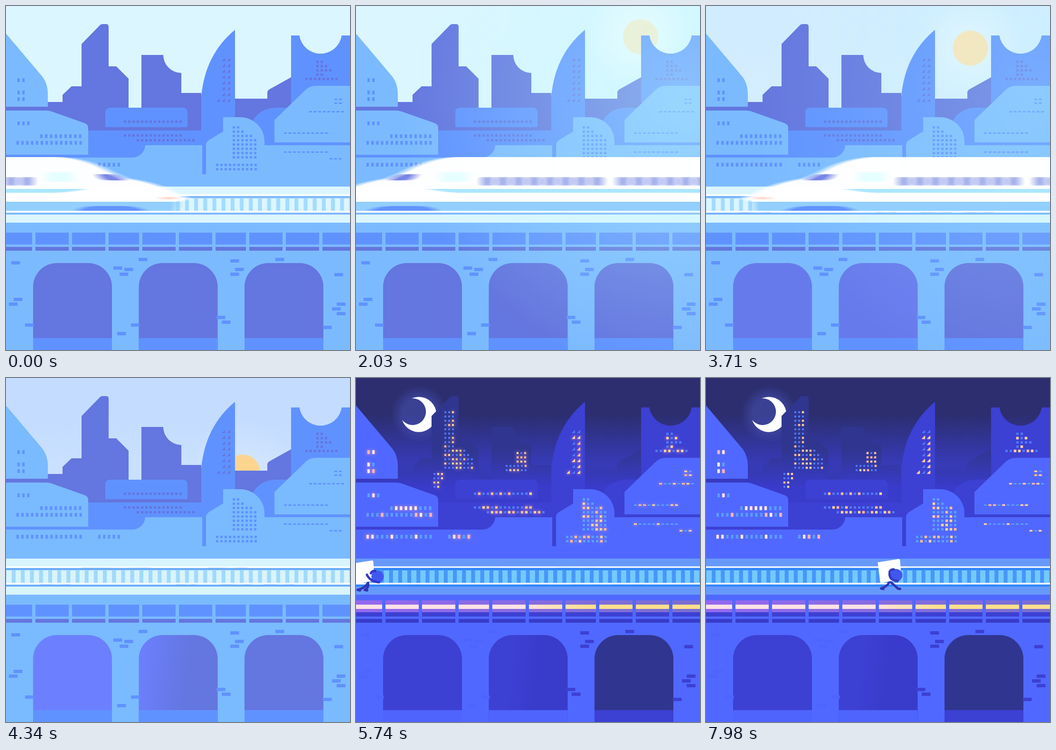
An HTML page with a canvas for the animation above (8000 ms loop, 724x724 px).

```html
<!DOCTYPE html>
<html lang="en">
<head>
<meta charset="utf-8">
<title>Day and night on the viaduct</title>
<style>
  html, body { margin: 0; width: 100%; height: 100%; overflow: hidden; }
  canvas { display: block; width: 100%; height: 100%; }
</style>
</head>
<body>
<canvas id="stage" width="724" height="724"></canvas>
<script>
const SIZE = 724, LOOP = 8000;
const ctx = document.getElementById('stage').getContext('2d');
const clamp = (v, a = 0, b = 1) => Math.min(b, Math.max(a, v));
const ramp = (t, a, b) => clamp((t - a) / (b - a));
const easeOut = p => 1 - (1 - p) ** 3;
const random = (x, y) => { const v = Math.sin(x * 12.9 + y * 78.2) * 43758.5; return v - Math.floor(v); };

// Colours for day, sunset, dusk and night
const KEY_TIMES = [3300, 4340, 4760, 5400];
const PALETTE = {
  skyTop:  '#dcf6ff #c3dcff #635891 #2c2e70',
  skyLow:  '#dcf6ff #c9e0ff #6078e0 #363ab4',
  sun:     '#ffecc8 #fbd590 #f0b070 #f0b070',
  farTop:  '#6476df #6476df #4148a8 #30368f',
  farLow:  '#6476df #6476df #3b3cd4 #393bca',
  mid:     '#6092ff #6092ff #5068ff #3c40d3',
  near:    '#7cbaff #7abaff #6a80fa #5068ff',
  bed:     '#dcf6ff #d8f4fc #86baff #6799fc',
  gap:     '#a4dcff #a2d9fc #6fb2ff #4896fb',
  sleeper: '#dcf6ff #d8f4fc #88c8ff #74caff',
  shadow:  '#80b8ff #6aacfa #3286f8 #2f86fa',
  arch:    '#6476df #6c80ff #5068ff #3c40d3',
  trim:    '#6092ff #6092ff #5068ff #4e64fc',
  winNear: '#6092ff #6092ff #6ea6ff #5c9dff',
  winDark: '#6476df #6476df #7496ff #5078f4'
};
for (const k in PALETTE)
  PALETTE[k] = PALETTE[k].split(' ').map(h => [1, 3, 5].map(i => parseInt(h.slice(i, i + 2), 16)));

const mix = (a, b, p) => `rgb(${a.map((v, j) => Math.round(v + (b[j] - v) * p))})`;
function coloursAt(t) {
  const i = t < KEY_TIMES[1] ? 0 : t < KEY_TIMES[2] ? 1 : 2;
  const p = ramp(t, KEY_TIMES[i], KEY_TIMES[i + 1]);
  return Object.fromEntries(Object.entries(PALETTE).map(([k, v]) => [k, mix(v[i], v[i + 1], p)]));
}

function fill(colour, path, c = ctx) {
  c.fillStyle = colour;
  c.fill(typeof path === 'string' ? new Path2D(path) : path);
}
function rect(colour, x, y, w, h) {
  ctx.fillStyle = colour;
  ctx.fillRect(x, y, w, h);
}
function rounded(colour, x, y, w, h, r, c = ctx) {
  const p = new Path2D();
  p.roundRect(x, y, w, h, r);
  fill(colour, p, c);
}
function disc(colour, x, y, r) {
  const p = new Path2D();
  p.arc(x, y, r, 0, Math.PI * 2);
  fill(colour, p);
}
function linear(x0, y0, x1, y1, ...stops) {
  const g = ctx.createLinearGradient(x0, y0, x1, y1);
  stops.forEach(([at, c]) => g.addColorStop(at, c));
  return g;
}
function glow(x, y, inner, outer, rgb, alpha) {
  const g = ctx.createRadialGradient(x, y, inner, x, y, outer);
  g.addColorStop(0, `rgba(${rgb},${alpha})`);
  g.addColorStop(1, `rgba(${rgb},0)`);
  rect(g, 0, 0, SIZE, SIZE);
}

const SHAPES = {
  far: 'M0 202H119V187L138 169H159V80L198 40Q200 38 204 38H211Q216 38 216 44V127H232L258 153V214H285V103H331A38 38 0 0 0 369 141V183H411V195H550V182Q550 178 555 175L600 150V320H0Z',
  tower: 'M600 62H617.5A45 45 0 0 0 706.5 62H724V293H600Z',
  sail: 'M411 300V190Q419 102 482 50V300Z',
  dome: 'M519 293V242Q535 214 570 214H600V293Z',
  hillTop: 'M0 58L76 148Q88 163 88 186V212H0Z',
  hillLow: 'M0 220H84Q90 220 96 222L164 246Q173 249 173 256V313H0Z',
  house: 'M421 380V293Q421 287 426 283L457 264V234H493A51 51 0 0 1 544 285V380Z',
  rightHouse: 'M565 287V240L630 177Q639 168 652 168H724V287Z'
};

// The train is drawn once, both ends alike, and smeared along its travel.
const TRAIN = { length: 1200, pad: 40, top: 300, speed: 1.738, period: 1599 };
function makeTrain() {
  const layer = () => Object.assign(document.createElement('canvas'), { width: TRAIN.length + TRAIN.pad * 2, height: 150 });
  const half = (c) => {
    fill('#fff', 'M600 318H930Q978 322 1017 340Q1043 354 1069 363Q1125 371 1160 388L1200 406L1176 412L1172 431H600Z', c);
    fill('#8cc8f6', 'M600 412H1176L1172 431H600Z', c);
    fill('#6092ff', 'M965 431Q975 421 1005 421H1060Q1090 421 1108 431Z', c);
    fill('#a8dcfa', 'M600 385H985Q950 392 920 393H600Z', c);
    fill('#7580dc', 'M1008 354H1035Q1052 358 1064 367H1028Q1012 365 1008 354Z', c);
    rounded('#dff6fc', 900, 350, 55, 20, 4, c);
    for (let x = 848; x > 600; x -= 33) rounded('#8894e4', x, 360, 21, 18, 5, c);
    rounded('#ffd8c8', 1140, 402, 34, 5, 2, c);
  };
  const sharp = layer(), s = sharp.getContext('2d');
  s.translate(TRAIN.pad, -TRAIN.top);
  half(s);
  s.translate(TRAIN.length, 0);
  s.scale(-1, 1);
  half(s);
  const smeared = layer(), m = smeared.getContext('2d'), copies = 12;
  m.globalCompositeOperation = 'lighter';
  m.globalAlpha = 1 / copies;
  for (let i = 0; i < copies; i++) m.drawImage(sharp, (i - copies / 2) * 2.2, 0);
  return smeared;
}
const train = makeTrain();

function drawTrains(t) {
  for (let i = 0; i < 3; i++) {
    const nose = 385 + TRAIN.speed * (t - i * TRAIN.period);
    if (nose > -40 && nose < SIZE + TRAIN.length + 40)
      ctx.drawImage(train, nose - TRAIN.length - TRAIN.pad, TRAIN.top);
  }
}

function drawSky(t, c, light) {
  rect(linear(0, 0, 0, 220, [.35, c.skyTop], [.8, c.skyLow]), 0, 0, SIZE, 330);
  const set = clamp((t - 3250) / 1090, 0, 1.6);
  if (t > 400 && set < 1.6) {
    const high = 780 - 181 * easeOut(ramp(t, 400, 1672));
    const x = high - 101 * set;
    const y = 38 + .00265 * (high - 700) ** 2 + 133 * set * set;
    glow(x, y, 30, 115, '255,255,255', .65 * Math.max(light, .25 * (1 - ramp(t, 4340, 4600))));
    disc(c.sun, x, y, 37);
  }
  if (t > 4900) {
    const rise = easeOut(ramp(t, 4900, 5650));
    ctx.save();
    ctx.translate(57 * (1 - rise), 130 * (1 - rise));
    glow(133, 76, 35, 60, '76,88,190', .45 * rise);
    fill('#fff', 'M97 88A37 37 0 1 0 117 43A28 28 0 1 1 97 88Z');
    ctx.restore();
  }
}

function drawCity(c) {
  fill(linear(0, 150, 0, 230, [0, c.farTop], [1, c.farLow]), SHAPES.far);
  for (const name of ['tower', 'sail', 'dome']) fill(c.mid, SHAPES[name]);
  rounded(c.mid, 209, 214, 173, 41, [9, 9, 2, 2]);
  rect(c.mid, 173, 262, 240, 60);
  rect(c.near, 0, 293, SIZE, 87);
  rounded(c.mid, 0, 285, 293, 34, [0, 0, 27, 0]);
  rect(c.mid, 413, 262, 9, 92);
  rect(c.mid, 544, 287, 180, 6);
  for (const name of ['hillTop', 'hillLow', 'house', 'rightHouse']) fill(c.near, SHAPES[name]);
}

function drawWindows(t, c) {
  const pink = ['#fff0e4', '#ffb8b0', '#ffe4f2'], gold = ['#ffd79a', '#ffc08c'];
  const large = { tone: c.winNear, w: 5, h: 8, step: 10.2, lit: pink };
  const small = { tone: c.winNear, w: 5, h: 5, step: 9, lit: gold };
  const flat = { tone: c.winNear, w: 6, h: 3, step: 9.6, lit: gold };
  const dark = { tone: c.winDark, w: 5, h: 5, step: 9, lit: gold };
  const tiny = { tone: c.winDark, w: 4, h: 4, step: 8, lit: gold };
  const sail = { tone: c.winDark, w: 7, h: 7, step: 11, lit: gold, slanted: true };
  const halo = 6 - 4 * ramp(t, 5950, 6720);

  function row(style, x0, y, count) {
    for (let x = x0, i = 0; i < count; i++, x += style.step) {
      const r = random(x, y);
      const lit = r < .42 && t > 4950 + 700 * random(y, x);
      const colour = lit ? style.lit[Math.floor(r * 97) % style.lit.length] : style.tone;
      ctx.shadowBlur = lit ? halo : 0;
      ctx.shadowColor = '#ff9fb0';
      if (style.slanted) fill(colour, `M${x + 7} ${y}v7h-7z`);
      else rect(colour, x, y, style.w, style.h);
    }
  }
  const rows = (n, paint) => { for (let j = 0; j < n; j++) paint(j); };

  rows(3, j => row(large, 24, 152 + (j && 12) + 14 * j, 2));
  row(large, 24, 243, 3);
  row(large, 72, 270, 9);
  rows(2, j => row(large, 22, 284 + 46 * j, 14));
  row(large, 194, 330, 5);
  rows(2, j => row(dark, 248, 241 + 29 * j, 14));
  row(dark, 275, 280, 14);
  rows(5, j => row(dark, j < 4 ? 653 : 630, 115 + 9 * j, j < 4 ? 2 + j % 3 : 8));
  rows(8, j => row(sail, j < 7 ? 454 : 443, 109 + 12.2 * j, j < 7 ? 2 : 3));
  rows(8, j => row(small, 477, 253 + 9 * j, Math.min(6, 2 + j + (j > 1))));
  rows(2, j => row(small, 442, 332 + 9 * j, 10));
  rows(2, j => row(flat, 691, 195 + 8 * j, 2));
  rows(2, j => row(flat, 585, 266 + 40 * j, 10));
  row(flat, 638, 221, 8);
  row(flat, 681, 320, 3);
  rows(14, j => row(tiny, 186, 70 + 9 * j, j < 9 ? 3 : Math.min(8, j - 3)));
  rows(4, j => row(tiny, 163, 200 + 9 * j, j < 2 ? 3 : 2));
  rows(5, j => row(tiny, j < 3 ? 338 : 315, 156 + 9 * j, j < 3 ? 3 : 6));
  ctx.shadowBlur = 0;
}

function drawTrack(t, c) {
  rect(c.bed, 0, 380, SIZE, 76);
  rect(c.shadow, 0, 400, SIZE, 4);
  rect(c.gap, 0, 404, SIZE, 28);
  for (let x = 1; x < SIZE; x += 19.2) rect(c.sleeper, x, 405, 11, 26);
  rect(c.shadow, 0, 435, SIZE, 4);
  if (t > 2500) {
    const hump = (x, y, w) => fill(c.shadow, `M${x} ${y}l${w * .2} -7q${w * .3} 5 ${w * .6} 1l${w * .2} 6z`);
    hump(133, 404, 202);
    hump(410, 404, 115);
    for (const x of [60, 350, 440, 530]) hump(x, 439, x % 100 === 50 ? 60 : 90);
  }
  rect('#fff', 0, 396.5, SIZE, 3);
  rect('#fff', 0, 431, SIZE, 3.5);
}

function drawBricks(c) {
  const stack = (x, y, n = 1) => {
    for (let k = 0; k < n; k++) rect(x < 440 ? c.trim : c.mid, x - 10 * (k % 2), y + 10 * k, 18.5, 7);
  };
  // Similar bricks on the left and right halves of the bridge
  for (let side = 0; side < 2; side++) {
    stack(11 + 680 * side, 537 + 25 * side);
    stack(40 + 223 * side, 668);
    stack(226 + 246 * side, 548 - 15 * side);
    stack(279 + 288 * side, 530);
    stack(249 + 233 * side, 551, 2);
    stack(443 + 224 * side, 652 + 21 * side);
    stack(16 + 680 * side, 614 + 10 * side, 2 + side);
    stack(234 + 220 * side, 686 - 24 * side);
  }
}

function drawViaduct(t, c) {
  rect(c.near, 0, 456, SIZE, 268);
  rect(c.mid, 0, 477, SIZE, 25);
  rect(c.farLow, 0, 507, SIZE, 8);
  ctx.globalAlpha = ramp(t, 4850, 5500);
  rect(linear(0, 0, SIZE, 0, [0, '#9468f0'], [1, '#786fd0']), 0, 468, SIZE, 25);
  rect(linear(0, 0, SIZE, 0, [.48, '#ffe2e4'], [.68, '#ffe08c']), 0, 477, SIZE, 9);
  ctx.globalAlpha = 1;
  for (let i = 0; i < 9; i++) rect(c.near, 55 + 225 * Math.floor(i / 3) + 77 * (i % 3), 467, 7, 48);
  const night = ramp(t, 4340, 5000);
  const shaded = linear(340, 0, 450, 12, [night * .5, c.arch], [1, night ? c.farLow : c.arch]);
  [c.arch, shaded, c.farTop].forEach((colour, i) => {
    const x = 57 + 222.5 * i;
    rounded(colour, x, 541, 166, 183, [50, 50, 0, 0]);
    rect(i < 2 ? c.trim : c.mid, x, 699, 166, 25);
  });
  drawBricks(c);
}

function drawRunner(t) {
  if (t < 5560) return;
  const phase = (t - 5740) % 1400;
  const swing = Math.cos(phase / 336 * Math.PI * 2);
  ctx.save();
  ctx.translate(45 + .4226 * phase, 416.5 + 1.5 * swing);
  ctx.lineCap = ctx.lineJoin = 'round';
  ctx.lineWidth = 5;
  ctx.strokeStyle = '#3036b4';
  const hip = -17 - 3 * swing;
  for (const foot of [-37 - 5 * swing, -12 - 15 * swing])
    ctx.stroke(new Path2D(`M${hip} 13Q${(hip + foot) / 2 + 5} 24 ${foot} 28l5 1`));
  const shift = -8.5 * (1 + swing);
  fill('#fff', `M${shift - 39} -27l44 -7q3 0 3 3l3 39l-41 8q-4 0 -4 -4Z`);
  disc('#4058ee', 0, 0, 13);
  ctx.strokeStyle = '#3439c4';
  ctx.stroke(new Path2D(`M${-14 + shift / 2} -4Q-15 11 3 12M-5 -12Q-11 -13 -14 -7`));
  ctx.restore();
}

function draw(t) {
  const c = coloursAt(t);
  const light = ramp(t, 350, 850) * (1 - ramp(t, 3300, 4250));
  drawSky(t, c, light);
  drawCity(c);
  drawWindows(t, c);
  drawTrack(t, c);
  drawViaduct(t, c);
  if (light) glow(690, 180, 0, 600, '190,250,255', .45 * light);
  drawTrains(t);
  drawRunner(t);
}

function frame(now) {
  draw(now % LOOP);
  requestAnimationFrame(frame);
}
requestAnimationFrame(frame);
</script>
</body>
</html>
```
